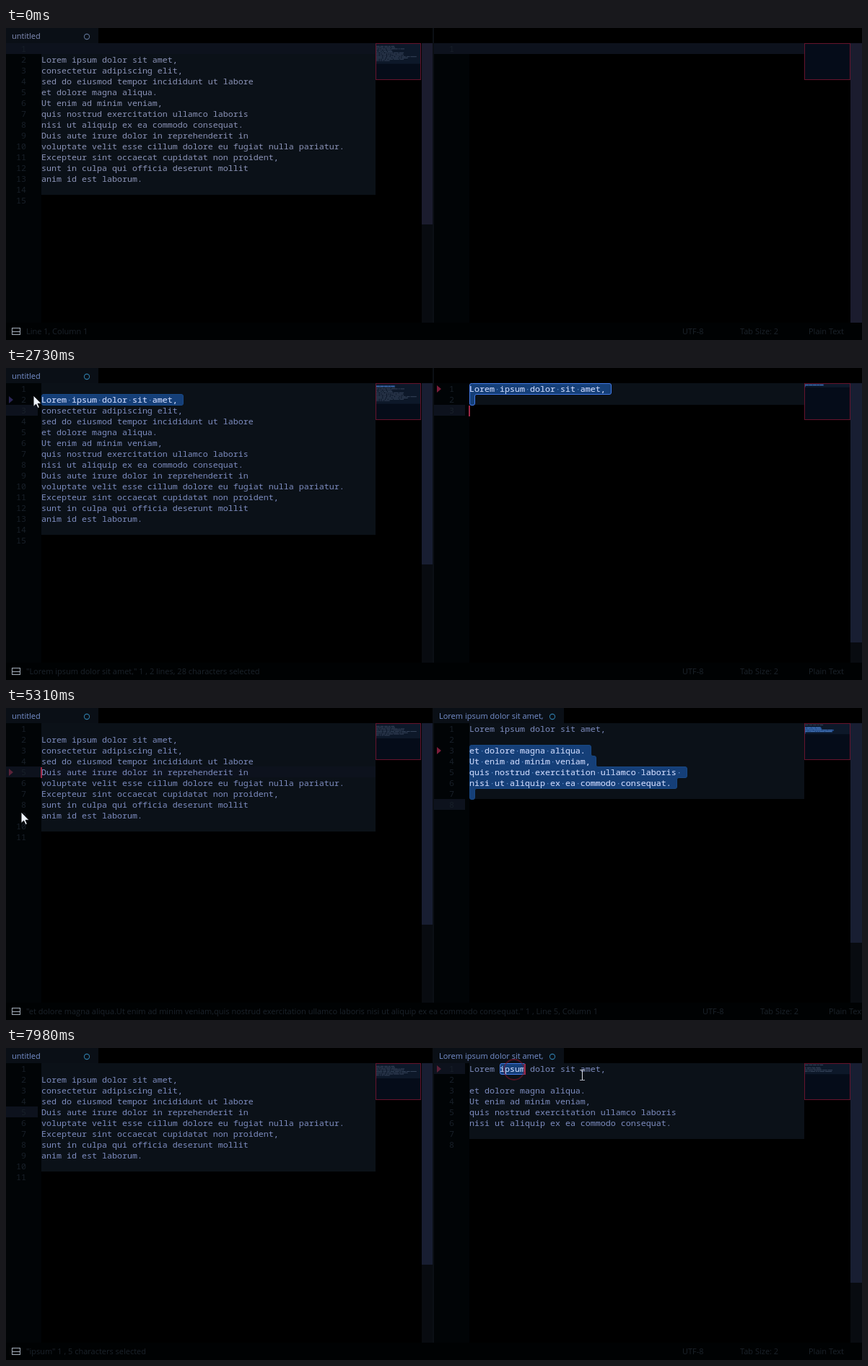
Animation, 1186 px wide and 432 px high, one loop 8000 ms. Source, as an HTML page with a canvas:

```html
<!DOCTYPE html>
<html lang="en">
<head>
<meta charset="utf-8">
<title>Split editor</title>
<style>
  html, body { margin: 0; width: 100%; height: 100%; overflow: hidden; background: #000; }
  canvas { display: block; width: 1186px; height: 432px; }
</style>
</head>
<body>
<canvas id="stage" width="1186" height="432"></canvas>
<script>
const g = document.getElementById('stage').getContext('2d');
const LOOP = 8000, TOP = 21, ROW = 15, CH = 7, TEXT_X = 49, FOOT = 408, BLINK = 530;
const CODE = '11.667px "Noto Sans Mono", "DejaVu Sans Mono", monospace';
const UI = '11px "Open Sans", "Noto Sans", sans-serif';

const first = 'Lorem ipsum dolor sit amet,';
const head = ['', first, 'consectetur adipiscing elit,', 'sed do eiusmod tempor incididunt ut labore'];
const moved = ['et dolore magna aliqua.', 'Ut enim ad minim veniam,',
  'quis nostrud exercitation ullamco laboris ', 'nisi ut aliquip ex ea commodo consequat.'];
const tail = ['Duis aute irure dolor in reprehenderit in',
  'voluptate velit esse cillum dolore eu fugiat nulla pariatur.',
  'Excepteur sint occaecat cupidatat non proident,',
  'sunt in culpa qui officia deserunt mollit', 'anim id est laborum.', '', ''];
const quote = n => '"' + moved.slice(0, n).join('') + '" 1 , ';

// One step of the drag over the lines to be moved.
function drag(i) {
  const n = i + 1, chars = moved.slice(0, n).join('\n').length + 1;
  return { at: 3870 + i * 60, focus: 'L', caret: 0,
    L: { row: 5 + n, sel: { from: 5, to: 4 + n }, mark: 5, tint: '#8a1f40' },
    status: quote(Math.min(n, 3)) + `${n + 1} lines, ${chars} characters selected` };
}

const steps = [
  { at: 0, status: 'Line 1, Column 1', shift: 0, tab: false, caret: null, focus: 'L',
    L: { lines: [...head, ...moved, ...tail], row: 1, wide: true, thumb: 272 },
    R: { lines: [''], row: 1, wide: true, tint: '#7c1c3a', thumb: FOOT } },
  { at: 1380, status: `"${first}" 1 , 2 lines, 28 characters selected`, caret: 0,
    L: { row: 3, wide: false, sel: { from: 2, to: 2 }, mark: 2, tint: '#2b2656' } },
  { at: 2730, focus: 'R', caret: 0,
    R: { lines: [first, '', ''], row: 3, wide: false, sel: { from: 1, to: 2 }, mark: 1, thumb: 380 } },
  { at: 2820, tab: true },
  ...moved.map((_, i) => drag(i)),
  { at: 4140, status: quote(4) + '5 lines, 133 characters selected' },
  { at: 5310, status: quote(4) + 'Line 5, Column 1', shift: 28, focus: 'L', caret: 0,
    L: { lines: [...head, ...tail], row: 5, wide: true, sel: null, tint: '#5a2238', thumb: 300 },
    R: { lines: [first, '', ...moved, '', ''], row: 8, sel: { from: 3, to: 7 }, mark: 3, thumb: 325 } },
  { at: 5340, status: 'Line 5, Column 1', shift: 0 },
  { at: 5490, L: { mark: 0 } },
  { at: 6900, status: 'Line 1, Column 10', focus: 'R', caret: 9,
    L: { wide: false }, R: { row: 1, sel: null, mark: 1, tint: '#5c2038' } },
  { at: 7470, status: '"ipsum" 1 , 5 characters selected', caret: 11,
    R: { sel: { from: 1, to: 1, start: 6, end: 11 } } }
];

// Each leg brings the pointer to x, y; bow bends the way downwards.
const legs = [
  { at: 450, ms: 30, x: 55, y: 39 },
  { at: 780, ms: 270, x: 38, y: 38, arrow: true },
  { at: 3210, ms: 390, x: 22, y: 86, arrow: true },
  { at: 3840, ms: 240, x: 22, y: 144 },
  { at: 5130, ms: 30, x: 21, y: 144, arrow: true },
  { at: 5790, ms: 60, x: 197, y: 158 },
  { at: 6060, ms: 210, x: 691, y: 97, bow: 100 },
  { at: 6360, ms: 450, x: 704, y: 33 },
  { at: 7690, ms: 290, x: 798, y: 37 }
];
const clicks = [{ at: 1680, x: 37, y: 38 }, { at: 3870, x: 22, y: 86 }, { at: 7690, x: 704, y: 30 }];

const rowY = n => TOP + (n - 1) * ROW;

function rect(x, y, w, h, c) { g.fillStyle = c; g.fillRect(x, y, w, h); }

function text(s, x, y, c, font, align = 'left') {
  g.font = font; g.fillStyle = c; g.textAlign = align;
  g.fillText(s, x, y);
}

function ring(x, y, r, c, w) {
  g.beginPath(); g.arc(x, y, r, 0, 7);
  g.strokeStyle = c; g.lineWidth = w; g.stroke();
}

function mix(a, b, k) {
  return `rgb(${a.map((v, i) => Math.round(v + (b[i] - v) * k))})`;
}

function stateAt(t) {
  const s = { L: {}, R: {} };
  for (const { at, L, R, ...rest } of steps) {
    if (at > t) break;
    Object.assign(s, rest);
    Object.assign(s.L, L);
    Object.assign(s.R, R);
    if ('caret' in rest) s.since = at;
  }
  return s;
}

function selection(x, { lines, sel }, lit) {
  const { from, to, start = 0, end } = sel, l = x + start * CH;
  const pts = [[l, rowY(from)]];
  for (let n = from; n <= to; n++) {
    const r = x + (end ?? lines[n - 1].length + 1) * CH;
    pts.push([r, rowY(n)], [r, rowY(n + 1)]);
  }
  pts.push([l, rowY(to + 1)]);
  const q = pts.map(([px, py]) => [px + .5, py + .5]), n = q.length;
  g.beginPath();
  g.moveTo(q[0][0] + 4, q[0][1]);
  for (let i = 1; i <= n; i++) g.arcTo(...q[i % n], ...q[(i + 1) % n], 2.5);
  g.closePath();
  g.fillStyle = '#153f78'; g.fill();
  g.strokeStyle = lit ? '#4279e6' : '#184884'; g.lineWidth = 1; g.stroke();
}

function minimap(x, w, { lines, sel }) {
  const rows = lines.length - 1;
  rect(x, TOP, w, 51, '#050c19');
  if (rows) rect(x, TOP + 1, w, rows * 1.9 + 1, '#0d1829');
  lines.forEach((line, i) => {
    const y = TOP + 2 + i * 1.8;
    const on = sel && !sel.end && i + 1 >= sel.from && i < sel.to;
    if (on) rect(x + 1, y - .4, line.length * .93 + 1, 1.9, '#1c4788');
    for (const m of line.matchAll(/\S+/g))
      rect(x + 1 + m.index * .93, y, m[0].length * .93, 1, on ? '#4a78b8' : '#354359');
  });
  g.strokeStyle = '#66142d'; g.lineWidth = 1;
  g.strokeRect(x + .5, TOP + .5, w - 1, 50);
}

function pane(ox, p, lit, ink, thumb) {
  const x = ox + TEXT_X, left = ox ? 592 : 0, mapX = ox ? 1106 : 512, mapW = ox ? 64 : 63;
  const barX = mapX + mapW + (ox ? 0 : 1), numX = ox + 28;
  rect(left, TOP, x - left, FOOT - TOP, '#010406');
  rect(x, TOP, mapX - x, (p.lines.length - 1) * ROW, '#0b1118');
  rect(left, rowY(p.row), p.wide ? mapX - left : 44, ROW, '#0d121d');
  minimap(mapX, mapW, p);
  rect(barX, TOP, 16, FOOT - TOP, '#080b10');
  rect(barX, TOP, 16, p.thumb - TOP, thumb);
  if (p.mark) {
    const y = rowY(p.mark) + 8;
    g.beginPath();
    g.moveTo(ox + 4, y - 5); g.lineTo(ox + 10, y); g.lineTo(ox + 4, y + 5); g.closePath();
    g.fillStyle = p.tint; g.fill();
  }
  if (p.sel) selection(x, p, lit);
  p.lines.forEach((line, i) => {
    const n = i + 1, y = rowY(n) + 12;
    text(n, numX, y, '#182029', CODE, 'right');
    text(line, x, y, ink, CODE);
    if (!p.sel || n < p.sel.from || n > p.sel.to) return;
    const { start = 0, end } = p.sel, part = line.slice(start, end);
    text(part, x + start * CH, y, '#c2d3f6', CODE);
    for (const m of part.matchAll(/ /g))
      rect(x + (start + m.index) * CH + 3, y - 4, 1.3, 1.3, '#5d8ccb');
  });
}

function pointer(t) {
  const i = legs.findLastIndex(l => l.at <= t);
  if (i < 0) return;
  const b = legs[i], a = legs[i - 1] || b;
  const k = Math.min(1, (t - b.at) / b.ms), e = k * k * (3 - 2 * k);
  const x = a.x + (b.x - a.x) * e;
  const y = a.y + (b.y - a.y) * e + (b.bow || 0) * Math.sin(Math.PI * e);
  g.save();
  g.translate(Math.round(x), Math.round(y));
  if (b.arrow) {
    g.fillStyle = '#eef3fa'; g.strokeStyle = '#05080c'; g.lineWidth = 1;
    const p = new Path2D('M0 0V15.5L3.6 12.2L6 17.6L8.4 16.5L6.1 11.3H11Z');
    g.fill(p); g.stroke(p);
  } else {
    rect(0, -7, 1, 15, '#d5dae2');
    for (const end of [-7, 7]) rect(-3, end, 7, 1, '#aab0ba');
  }
  g.restore();
}

function draw(now) {
  const t = Math.floor(now / 30) * 30, s = stateAt(t), k = Math.min(1, t / 270);
  const ink = mix([140, 148, 184], [126, 141, 192], k);
  const title = mix([132, 143, 186], [118, 144, 206], k);
  const dot = mix([92, 112, 146], [46, 122, 166], k);
  const thumb = mix([27, 28, 46], [24, 30, 50], k);
  rect(0, 0, 1186, 432, '#000');
  rect(0, FOOT, 1186, 24, '#000203');

  rect(0, 0, 128, TOP, '#0a0f16');
  text('untitled', 8, 15, title, UI);
  ring(112, 12, 3.6, dot, 1.1);

  pane(0, s.L, s.focus === 'L', ink, thumb);
  pane(593, s.R, s.focus === 'R', ink, thumb);
  rect(591, 0, 2, FOOT, '#0b0f15');
  if (s.tab) {
    rect(593, 0, 180, TOP, '#0a0f16');
    text(first, 600, 15, title, UI);
    ring(757, 12, 3.6, dot, 1.1);
  }

  if (s.caret !== null && Math.floor((t - s.since) / BLINK) % 2 === 0) {
    const x = s.focus === 'R' ? 641 : 48;
    rect(x + s.caret * CH, rowY(s[s.focus].row) + 1, 2, ROW, '#9c2846');
  }

  g.strokeStyle = '#a3adba'; g.lineWidth = 1;
  g.strokeRect(8.5, 415.5, 11, 9);
  rect(9, 420, 10, 1, '#a3adba');
  const dim = '#1b232b';
  text(s.status, 28, 424, dim, UI);
  text('UTF-8', 937 + s.shift, 424, dim, UI);
  text('Tab Size: 2', 1017 + s.shift, 424, dim, UI);
  text('Plain Text', 1112 + s.shift, 424, dim, UI);

  for (const { at, x, y } of clicks) {
    const age = t - at;
    if (age < 0 || age > 600) continue;
    g.globalAlpha = 1 - age / 600;
    ring(x, y, 5 + age * .031, '#8a162a', 1.8);
    g.globalAlpha = 1;
  }
  pointer(t);
}

const start = performance.now();
function tick() {
  draw((performance.now() - start) % LOOP);
  requestAnimationFrame(tick);
}
tick();
</script>
</body>
</html>
```
